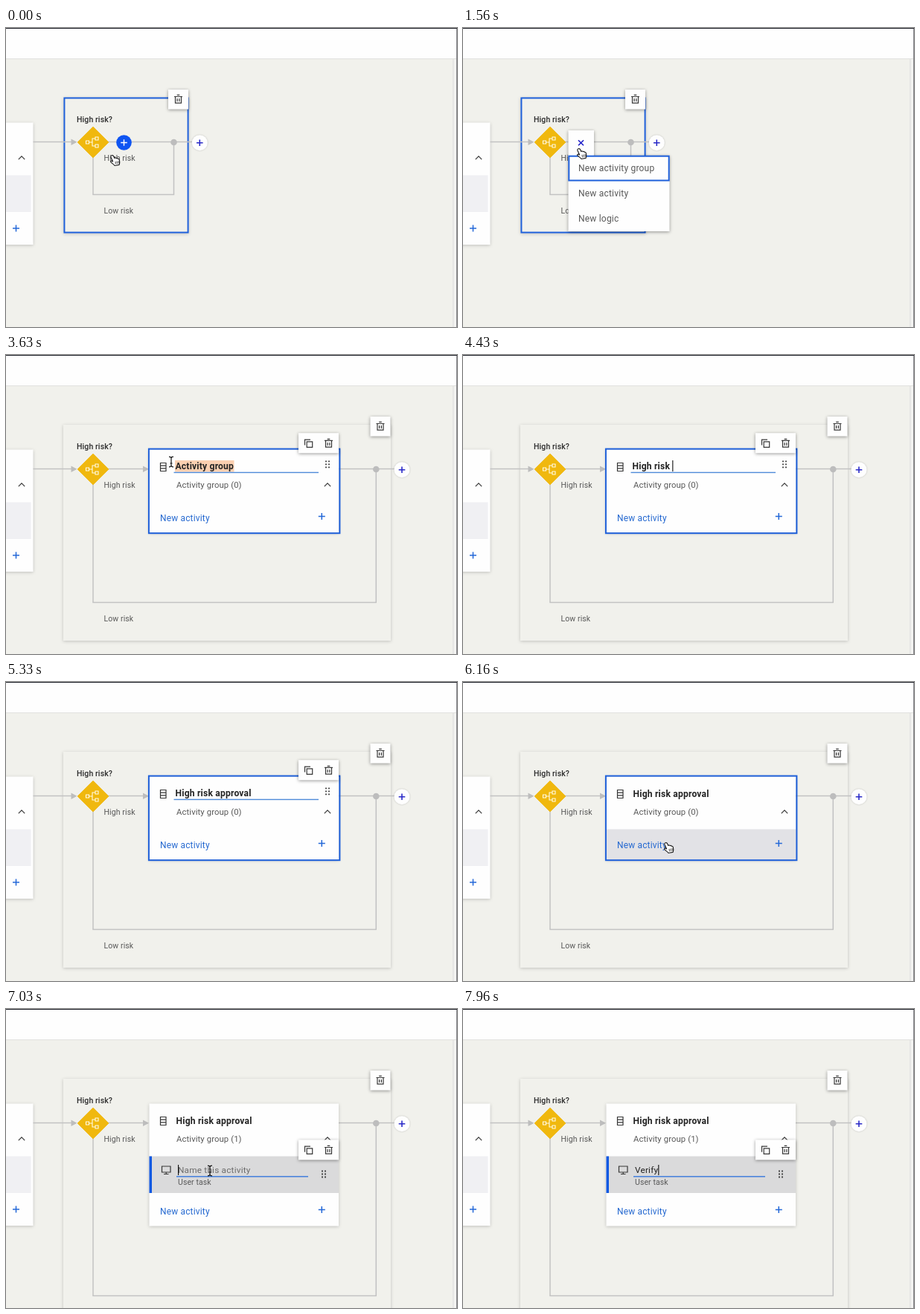
Recreate the animation shown at these times as an HTML page. Size 606x403 px, loop 8000 ms.

```html
<!DOCTYPE html>
<html lang="en">
<head>
<meta charset="utf-8">
<title>Workflow editor</title>
<style>
  html, body { margin: 0; width: 100%; height: 100%; overflow: hidden; background: #f1f1ec; }
  svg { display: block; width: 606px; height: 403px; }
  text { font-family: Roboto, "Open Sans", sans-serif; font-size: 12px; letter-spacing: .2px; fill: #585858; white-space: pre; }
  .small { font-size: 10.5px; letter-spacing: .1px; }
  .meta { font-size: 11.3px; letter-spacing: .1px; }
  .question { font-size: 10.5px; font-weight: 500; letter-spacing: .1px; fill: #2c2c2c; }
  .bold { font-size: 12.1px; font-weight: 700; fill: #242424; }
  .field { font-size: 11.8px; }
  .link { font-size: 11.9px; fill: #2468d0; }
  .panel { fill: #fefefe; filter: drop-shadow(0 1px 2px #0003); }
  .button { fill: #fefefe; filter: drop-shadow(0 1px 2px #0006); }
  .frame { fill: #f1f1ec; filter: drop-shadow(0 1px 2px #0003); }
  .wire { fill: none; stroke: #c2c2c2; stroke-width: 1.5; }
  .dot { fill: #bdbdbd; }
  .focus { fill: none; stroke: #1f60da; stroke-width: 2; }
  .icon { fill: none; stroke: #363636; stroke-width: 1.2; }
  .plus { fill: none; stroke: #2468d8; stroke-width: 1.5; }
</style>
</head>
<body>
<svg viewBox="0 0 606 403">
  <defs>
    <path id="trash" class="icon" d="M-5.5-3.5H5.5M-1.8-5.6H1.8M-4-3.5V5.2H4V-3.5M-1.4-1V3M1.4-1V3"/>
    <path id="copy" class="icon" d="M-5 2.5V-5H2.5M-2.3-2.3H5.2V5.2H-2.3Z"/>
    <path id="chevron" class="icon" d="M-4.2 2.1L0-2.1L4.2 2.1"/>
    <path id="plus" class="plus" d="M-4.5 0H4.5M0-4.5V4.5"/>
    <path id="grip" d="M-2-4v.01M2-4v.01M-2 0v.01M2 0v.01M-2 4v.01M2 4v.01" stroke="#363636" stroke-width="1.8" stroke-linecap="square"/>
    <path id="arrow" class="dot" d="M0-4.2L8 0L0 4.2Z"/>
    <g id="bin"><rect class="button" x="-13.5" y="-13" width="27" height="26.5"/><use href="#trash"/></g>
    <g id="tools">
      <rect class="button" x="393" y="-13.5" width="54" height="27"/>
      <use href="#copy" x="406.5" y=".4"/><use href="#trash" x="433.5" y=".2"/>
    </g>
    <g id="next">
      <circle class="button" r="10.5" style="filter:drop-shadow(0 0 1px #0003)"/>
      <path d="M-4.3 0H4.3M0-4.3V4.3" stroke="#2a2ac8" stroke-width="1.6"/>
    </g>
    <g id="branch">
      <path d="M0-20.8L20.8 0L0 20.8L-20.8 0Z" fill="#f0b80e" stroke="#f0b80e" stroke-linejoin="round"/>
      <path d="M-9.5-2h4v4h-4ZM-5.5 0H-1M3-5H-1V5H3M3-7h4v4h-4ZM3 3h4v4h-4Z" fill="none" stroke="#fffbe8" stroke-width="1.1"/>
    </g>
  </defs>

  <rect width="606" height="403" fill="#f1f1ec"/>
  <rect width="606" height="42" fill="#fefefe"/>
  <rect y="41" width="606" height="1" fill="#e0e0de"/>
  <rect x="601" y="42" width="5" height="361" fill="#f4f4f2"/>
  <rect x="600.5" y="42" width="1" height="361" fill="#dadada"/>
  <rect x="605" width="1" height="403" fill="#85858a"/>
  <rect width="606" height="1" fill="#22242c"/>

  <rect class="panel" x="-40" y="127.5" width="76.5" height="164.5"/>
  <rect y="198.5" width="33.5" height="49.5" fill="#f0f0f3"/>
  <use href="#chevron" x="21" y="175"/>
  <use href="#plus" x="13.5" y="270"/>

  <g id="smallFlow">
    <rect class="frame" x="77.5" y="93.5" width="168" height="183"/>
    <rect class="focus" x="78.4" y="94.4" width="166.2" height="181.2"/>
    <path class="wire" d="M117 153.6H250M117 154V224.5H225.5V154"/>
    <circle class="dot" cx="225.5" cy="154" r="4.3"/>
    <text class="small" x="131.5" y="179">High risk</text>
    <text class="small" x="131.5" y="250">Low risk</text>
    <circle cx="158.5" cy="154.5" r="10.3" fill="#0f55f2"/>
    <path d="M154.2 154.5h8.6M158.5 150.2v8.6" stroke="#fff" stroke-width="1.4"/>
    <use href="#next" x="260.3" y="154.7"/>
    <use href="#bin" x="231.5" y="96"/>
  </g>

  <g id="wideFlow">
    <rect id="frame" class="frame" x="77" y="94" width="440" height="291"/>
    <path id="loop" class="wire"/>
    <path class="wire" d="M117 153.6H185M447 153.6H522"/>
    <use href="#arrow" x="184" y="153.8"/>
    <circle class="dot" cx="497.3" cy="154" r="4.3"/>
    <text class="small" x="131.5" y="179">High risk</text>
    <text id="low" class="small" x="131.5">Low risk</text>
    <use href="#next" x="532" y="154.7"/>
    <use href="#bin" x="503" y="96"/>

    <rect id="card" class="panel" x="192.5" y="127.5" width="254.5"/>
    <rect id="hover" x="192.5" y="198.5" width="254.5" height="41" fill="#e2e2e6"/>
    <rect id="outline" class="focus" x="191.9" y="126.6" width="256.5" height="113.6"/>
    <path class="icon" d="M207.5 145.5h7.5v11h-7.5ZM207.5 149.2h7.5M207.5 152.9h7.5"/>
    <rect id="selection" x="227" y="142" width="79.5" height="15.5" fill="#fbd0b1"/>
    <text id="title" class="bold"></text>
    <rect id="titleLine" x="225.5" y="157.7" width="194.5" height="1.4" fill="#4f8bd9"/>
    <use id="titleGrip" href="#grip" x="432" y="147.3"/>
    <text id="count" class="meta" x="229" y="179"></text>
    <use href="#chevron" x="432" y="175"/>
    <g id="task">
      <rect x="192.5" y="198.5" width="254.5" height="49.5" fill="#dadadb"/>
      <rect x="192.5" y="198.5" width="3.5" height="49.5" fill="#1259e2"/>
      <path class="icon" d="M209.5 212h11.5v8h-11.5ZM215.2 220v2.5M212 222.5h6.5"/>
      <text id="name" class="field" x="231" y="221"></text>
      <rect x="229" y="225.2" width="177" height="1.3" fill="#2b70dc"/>
      <text class="small" x="231" y="237">User task</text>
      <use href="#grip" x="427" y="222.5"/>
    </g>
    <g id="add">
      <text class="link" x="207" y="224">New activity</text>
      <use href="#plus" x="424.3" y="217.5"/>
    </g>
    <use id="tools1" href="#tools" y="118.7"/>
    <use id="tools2" href="#tools" y="189.8"/>
    <rect id="caret" width="1.1" fill="#111"/>
  </g>

  <path class="wire" d="M36.5 153.6H88"/>
  <use href="#arrow" x="87.5" y="153.8"/>
  <text class="question" x="95" y="126.5">High risk?</text>
  <use href="#branch" x="117" y="154"/>

  <g id="menu">
    <rect class="button" x="141.5" y="138" width="34.5" height="36"/>
    <rect class="button" x="141.5" y="172" width="136" height="102"/>
    <rect x="142" y="166" width="33.5" height="12" fill="#fefefe"/>
    <rect id="menuHover" x="142" y="172" width="135" height="34" fill="#e5e5e5"/>
    <rect class="focus" x="142.3" y="172.7" width="134.4" height="32.8"/>
    <path d="M155 151.2l7 7M162 151.2l-7 7" stroke="#2020c8" stroke-width="1.6"/>
    <text x="155" y="193">New activity group</text>
    <text x="155" y="227">New activity</text>
    <text x="155" y="261">New logic</text>
  </g>

  <g id="hand" stroke="#222" stroke-linejoin="round" stroke-linecap="round">
    <path d="M1.6 2C2.6 1.1 3.8 1.5 4.4 2.6L5.8 5.4C6.6 4.7 7.8 4.9 8.3 5.7C9.2 5.2 10.1 5.5 10.5 6.4C11.4 6.2 12.1 6.8 12.3 7.7L12.7 10.8C12.8 12.3 12.4 13 12.1 14.3L6 15.5C4.6 13.5 2.5 12.6 .8 10.6C.2 9.8 1 8.8 2.1 9.2L3.6 9.9L.9 4C.6 3.2 .9 2.4 1.6 2Z" fill="#fff" stroke-width="1.2"/>
    <path d="M7 10.3l.6 2.7M9 9.9l.6 2.7M11 9.5l.5 2.7" fill="none" stroke-width=".8"/>
  </g>
  <path id="ibeam" d="M-3-6.8Q0-6.8 0-5Q0-6.8 3-6.8M0-5V5M-3 6.8Q0 6.8 0 5Q0 6.8 3 6.8M-1.5 2H1.5" fill="none" stroke="#111" stroke-width="1.2"/>
</svg>

<script>
const DURATION = 8000;
const TITLE = "High risk approval";
const NAME = "Verify";
const at = {
  menu: 660, menuHover: 1700, group: 2200, edit: 3190, commit: 5530,
  addHover: 5720, task: 6330, nameTyping: 7260
};

const el = {};
document.querySelectorAll("svg [id]").forEach(node => el[node.id] = node);

const show = (id, on) => el[id].style.display = on ? "" : "none";
const set = (id, attrs) => {
  for (const key in attrs) el[id].setAttribute(key, attrs[key]);
};
const label = (id, text) => {
  if (el[id].textContent !== text) el[id].textContent = text;
};

// Pointer path: time, x, y
const handPath = [
  [60, 140, 170], [360, 153, 161], [1560, 153, 161], [1930, 187, 187],
  [2500, 187, 187], [2720, 207, 160], [5530, 238, 176], [5860, 268, 211], [6130, 270, 215]
];
const ibeamPath = [
  [2720, 212, 160], [2920, 222, 144], [6330, 222, 144], [6331, 274, 218]
];

function place(id, path, t) {
  let i = path.findIndex(step => step[0] > t);
  if (i < 0) i = path.length;
  const from = path[Math.max(0, i - 1)];
  const to = path[Math.min(i, path.length - 1)];
  const p = to[0] > from[0] ? (t - from[0]) / (to[0] - from[0]) : 0;
  const ease = p * p * (3 - 2 * p);
  const [x, y] = [1, 2].map(k => from[k] + (to[k] - from[k]) * ease);
  set(id, { transform: `translate(${x} ${y})` });
}

const typedCount = (t, start, step) => t < start ? 0 : Math.floor((t - start) / step) + 1;

function titleCount(t) {
  return Math.min(4, typedCount(t, 3690, 70)) + Math.min(14, typedCount(t, 4130, 59));
}

function placeCaret(textId, text, x, y, height) {
  const width = text ? el[textId].getComputedTextLength() : 0;
  set("caret", { x: x + width, y, height });
}

function render(t) {
  const editing = t >= at.edit && t < at.commit;
  const hasTask = t >= at.task;
  const grow = hasTask ? 53 : 0;
  const typedTitle = TITLE.slice(0, titleCount(t));
  const typedName = NAME.slice(0, typedCount(t, at.nameTyping, 118));

  show("smallFlow", t < at.group);
  show("wideFlow", t >= at.group);
  show("menu", t >= at.menu && t < at.group);
  show("menuHover", t >= at.menuHover);

  set("frame", { height: 291 + grow });
  set("loop", { d: `M117 154V${333.5 + grow}H497.3V154` });
  set("low", { y: 359 + grow });
  set("card", { height: 112 + grow, y: 127.5 });
  set("add", { transform: `translate(0 ${grow})` });

  show("outline", !hasTask);
  show("hover", t >= at.addHover && !hasTask);
  show("task", hasTask);
  show("tools1", t < at.commit);
  show("tools2", hasTask);
  show("titleGrip", t < at.commit);
  show("titleLine", editing);
  show("selection", editing && !typedTitle);

  label("title", typedTitle || "Activity group");
  set("title", editing ? { x: 227.5, y: 154 } : { x: 228.5, y: 155 });
  label("count", `Activity group (${hasTask ? 1 : 0})`);
  label("name", typedName || "Name this activity");
  el.name.style.fill = typedName ? "#222" : "#6c6c6c";

  const titleCaret = editing && typedTitle && t < 5200;
  const nameCaret = t >= at.task + 60 && (typedName || t < 6730 || t >= 6960);
  show("caret", titleCaret || nameCaret);
  if (hasTask) placeCaret("name", typedName, 231, 210, 14);
  else if (titleCaret) placeCaret("title", typedTitle, 227.5, 142, 15);

  show("hand", t < 2720 || (t >= at.commit && !hasTask));
  show("ibeam", (t >= 2720 && !typedTitle) || (hasTask && !typedName));
  place("hand", handPath, t);
  place("ibeam", ibeamPath, t);
}

const start = performance.now();
function tick() {
  render((performance.now() - start) % DURATION);
  requestAnimationFrame(tick);
}
tick();
</script>
</body>
</html>
```
